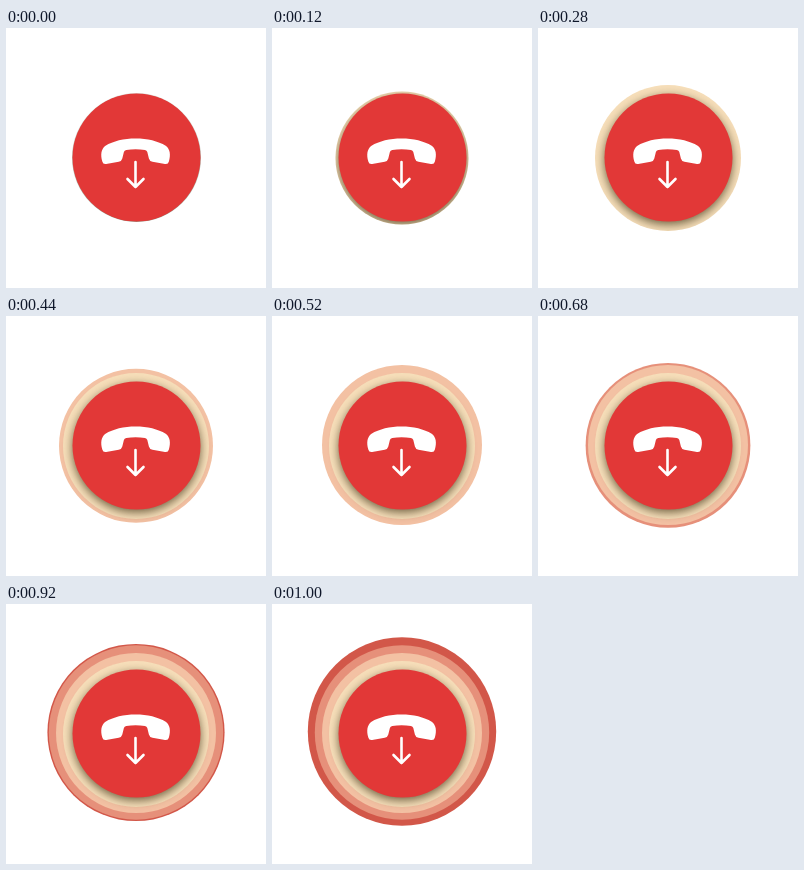
An HTML page with a canvas for the animation above (1.2 s loop, 260 by 260 pixels).

```html
<!DOCTYPE html>
<html lang="en">
<head>
<meta charset="utf-8">
<title>Hang-up button</title>
<style>
html, body { margin: 0; width: 100%; height: 100%; overflow: hidden; background: #fff; }
canvas { display: block; }
</style>
</head>
<body>
<canvas id="stage" width="260" height="260"></canvas>
<script>
const ctx = document.getElementById('stage').getContext('2d');
const LOOP = 1200, STEP = 40;

// Each ring grows in equal steps from r0 to r1 while its centre rises from y0 to y1.
const rings = [
  { start: 80, steps: 6, r0: 64.9, r1: 73, y0: 130, y1: 130, color: '#f7dfba' },
  { start: 440, steps: 3, r0: 77, r1: 80, y0: 129.8, y1: 129, color: '#f3c1a3' },
  { start: 680, steps: 3, r0: 82.4, r1: 87.2, y0: 129.4, y1: 128.5, color: '#e6907a' },
  { start: 920, steps: 3, r0: 88.6, r1: 94.2, y0: 128.5, y1: 127.5, color: '#d25749' }
];

const handset = new Path2D(`M96.3 133.5 C94.4 127 95 121 99.5 117.8
  C107 113 118 110.5 129.6 110.5 C141.2 110.5 152.2 113 159.7 117.8
  C164.2 121 164.8 127 162.9 133.5 Q162.1 136.6 159 136
  L146.5 133.8 Q143.6 133.3 142.9 130.5 L141.3 124 Q140.8 122.3 139 122
  Q129.6 120.7 120.2 122 Q118.4 122.3 117.9 124 L116.3 130.5
  Q115.6 133.3 112.7 133.8 L100.2 136 Q97.1 136.6 96.3 133.5Z`);
const arrow = new Path2D('M129.5 134 V159 M121.5 151 L129.5 159 L137.5 151');

const mix = (a, b, p) => a + (b - a) * p;

function disc(x, y, r, color) {
  ctx.beginPath();
  ctx.arc(x, y, r, 0, Math.PI * 2);
  ctx.fillStyle = color;
  ctx.fill();
}

function drawButton() {
  ctx.shadowColor = 'rgba(60, 48, 20, 0.72)';
  ctx.shadowBlur = 10;
  ctx.shadowOffsetY = 3;
  disc(130.5, 129.5, 64, '#e23837');
  ctx.shadowColor = 'transparent';
  ctx.fillStyle = ctx.strokeStyle = '#fff';
  ctx.fill(handset);
  ctx.lineWidth = 2.6;
  ctx.lineCap = ctx.lineJoin = 'round';
  ctx.stroke(arrow);
}

function draw(now) {
  const t = now % LOOP;
  const visible = rings.filter(ring => t >= ring.start).map(ring => {
    const step = Math.min(Math.floor((t - ring.start) / STEP), ring.steps - 1);
    const p = step / (ring.steps - 1);
    return { x: 130, y: mix(ring.y0, ring.y1, p), r: mix(ring.r0, ring.r1, p), color: ring.color };
  });
  // The shadow shows only inside the outermost shape.
  const edge = visible.at(-1) || { x: 130.5, y: 129.5, r: 64.5 };

  ctx.fillStyle = '#fff';
  ctx.fillRect(0, 0, 260, 260);
  for (const { x, y, r, color } of visible.reverse()) disc(x, y, r, color);
  ctx.save();
  ctx.beginPath();
  ctx.arc(edge.x, edge.y, edge.r, 0, Math.PI * 2);
  ctx.clip();
  drawButton();
  ctx.restore();
}

const origin = performance.now();
function tick() {
  draw(performance.now() - origin);
  requestAnimationFrame(tick);
}
tick();
</script>
</body>
</html>
```
